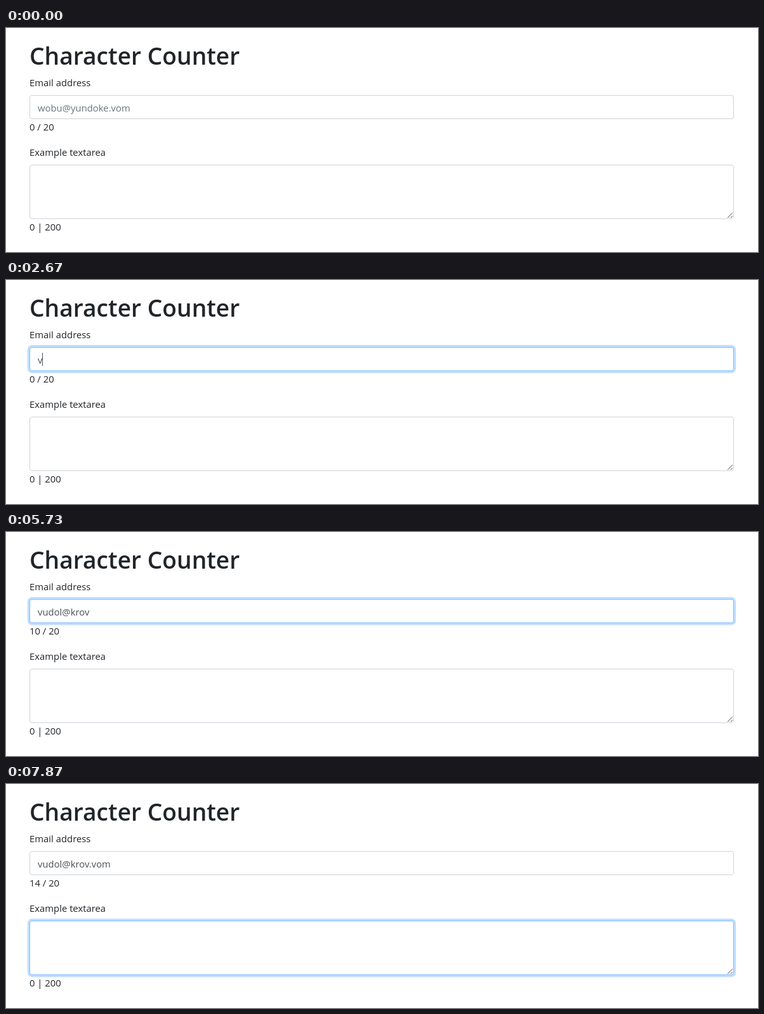
These frames come from a looping animation (1185 px wide and 354 px high, 8000 ms). An HTML page:

```html
<!DOCTYPE html>
<html lang="en">
<head>
<meta charset="utf-8">
<title>Character Counter</title>
<style>
  html, body { margin: 0; width: 100%; height: 100%; overflow: hidden; background: #fff; }
  svg { display: block; position: absolute; left: 0; top: 0; }
  text { font: 14.85px "Open Sans", "Noto Sans", sans-serif; fill: #212529; white-space: pre; }
  #title { font-size: 37.2px; font-weight: 600; }
  .field {
    position: absolute; left: 37px; width: 1110px; box-sizing: border-box;
    border: 1px solid #ced4da; border-radius: 4px; background: #fff;
  }
  #email { top: 106px; height: 38px; }
  #area { top: 216px; height: 86px; }
</style>
</head>
<body>
<div class="field" id="email"></div>
<div class="field" id="area"></div>
<svg width="1185" height="354" viewBox="0 0 1185 354">
  <text id="title" x="37" y="58">Character Counter</text>
  <text x="37" y="92">Email address</text>
  <text id="value" x="50" y="132"></text>
  <text id="count" x="37" y="162"></text>
  <text x="37" y="202">Example textarea</text>
  <text x="37" y="320">0 | 200</text>
  <path d="M1137 300l8-8M1142 300l3-3" stroke="#555" fill="none"/>
  <rect id="caret" width="1" height="21" fill="#495057"/>
  <g id="mouse">
    <path id="beam" d="M-3 -7.5h2.5q.5 0 1 .5q.5-.5 1-.5h2.5M.5 -7v14M-3 7.5h2.5q.5 0 1-.5q.5.5 1 .5h2.5" stroke="#000" fill="none"/>
    <path id="arrow" d="M.5.5v16l3.7-3.5 2.5 5.8 2.4-1-2.5-5.6h5z" stroke="#000" fill="#fff"/>
  </g>
</svg>
<script>
// All moments below are counted in ticks of a 15 Hz clock.
const RATE = 15, LOOP = 8000;
const BLINK_ON = 8, BLINK = 15, FADE = 2.25;
const HINT = "wobu@yundoke.vom", TYPED = "vudol@krov.vom";
const EMAIL_CLICK = 16.2, AREA_CLICK = 109.5;
const KEYS = [40, 47, 50, 52, 54, 60, 71, 74, 76, 78, 89, 92, 94, 97];

const $ = id => document.getElementById(id);
const show = (el, on) => { el.style.display = on ? "" : "none"; };
const clamp = x => Math.min(1, Math.max(0, x));
const smooth = x => x * x * (3 - 2 * x);
const mix = (a, b, p) => Math.round(a + (b - a) * p);
const typedBy = n => KEYS.filter(k => k <= n).length;
const fade = (n, click) => smooth(clamp((n - click) / FADE));

function setFocus(box, p) {
  box.style.borderColor = `rgb(${mix(206, 128, p)},${mix(212, 189, p)},${mix(218, 255, p)})`;
  box.style.boxShadow = p ? `0 0 0 ${3.2 * p}px rgba(0,123,255,${.25 * p})` : "none";
}

function drawCaret(n, typed) {
  const inArea = n >= AREA_CLICK;
  const click = Math.ceil(inArea ? AREA_CLICK : EMAIL_CLICK);
  const since = n - (typed && !inArea ? KEYS[typed - 1] : click);
  const width = typed && !inArea ? $("value").getComputedTextLength() : 0;
  const caret = $("caret");
  caret.setAttribute("x", Math.round(50 + width));
  caret.setAttribute("y", inArea ? 225 : 115);
  show(caret, since >= 0 && since % BLINK < BLINK_ON);
}

// Glides in to the email field, rests, then leaves downwards.
function drawMouse(n) {
  const enter = 1 - (1 - clamp((n - 6) / 5)) ** 2;
  const leave = clamp((n - 18) / 3) ** 2;
  const x = mix(281, 120, enter) + mix(0, 58, leave);
  const y = mix(305, 130, enter) + mix(0, 115, leave);
  const overLabel = y > 144 && y < 216;
  show($("mouse"), n >= 6 && leave < 1);
  show($("beam"), !overLabel);
  show($("arrow"), overLabel);
  $("mouse").setAttribute("transform", `translate(${x} ${y})`);
}

function draw(ms) {
  const n = Math.floor(ms * RATE / 1000 + .1);
  const typed = typedBy(n);
  const value = $("value");
  value.textContent = typed ? TYPED.slice(0, typed) : HINT;
  value.style.fill = typed ? "#495057" : "#6c757d";
  $("count").textContent = typedBy(n - 1) + " / 20";

  const area = fade(n, AREA_CLICK);
  setFocus($("email"), fade(n, EMAIL_CLICK) - area);
  setFocus($("area"), area);
  drawCaret(n, typed);
  drawMouse(n);
}

let start;
function tick(now) {
  start ??= now;
  draw((now - start) % LOOP);
  requestAnimationFrame(tick);
}
draw(0);
requestAnimationFrame(tick);
</script>
</body>
</html>
```
